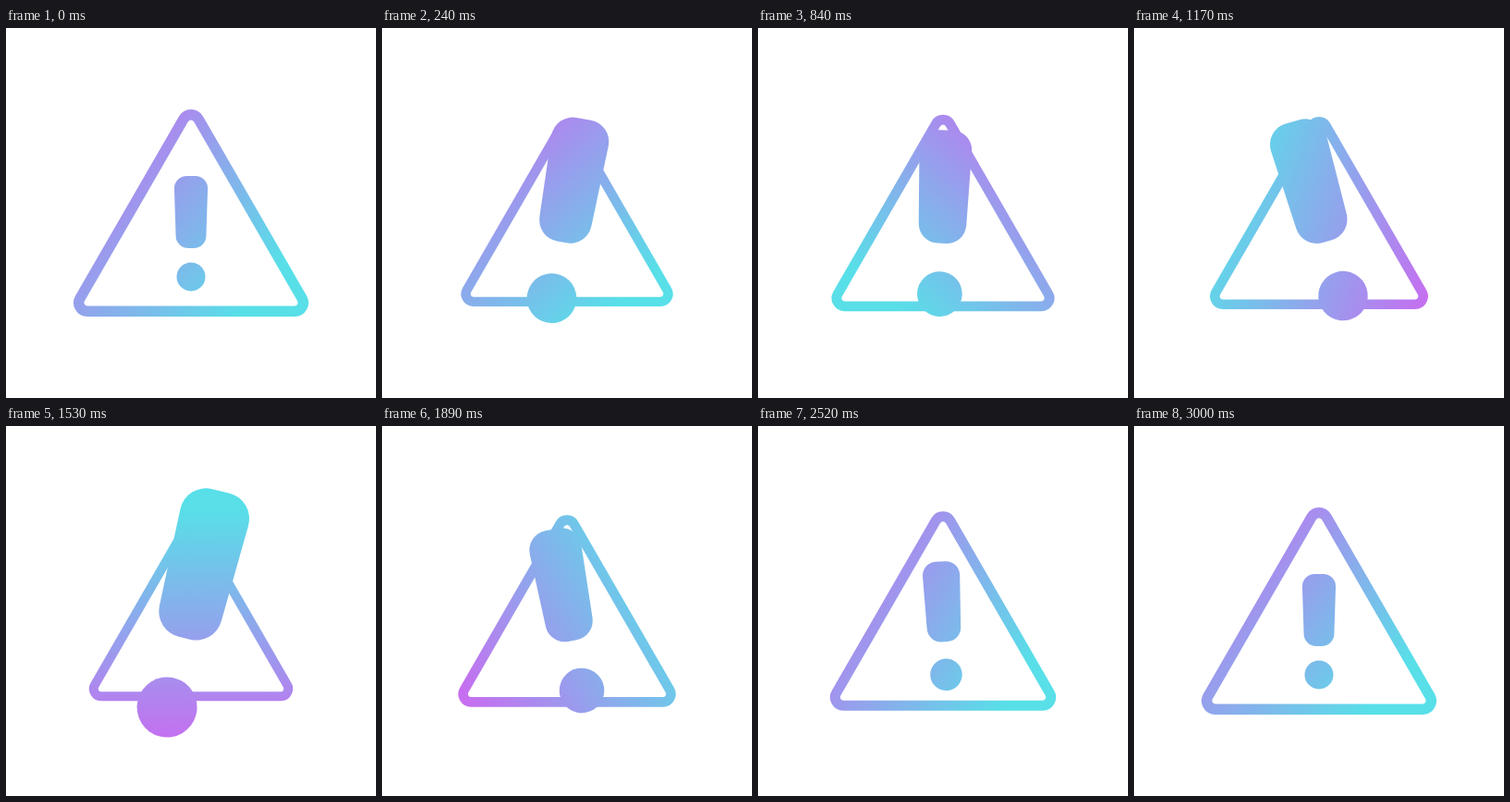
Write an HTML page with a canvas that moves like this. It is 400x400 px and loops after 5030 ms.

```html
<!DOCTYPE html>
<html lang="en">
<head>
<meta charset="utf-8">
<title>Warning</title>
<style>
  html, body { margin: 0; width: 100%; height: 100%; overflow: hidden; background: #fff; }
  canvas { display: block; width: 100vw; height: 100vh; }
</style>
</head>
<body>
<canvas id="stage" width="400" height="400"></canvas>
<script>
const ctx = document.getElementById('stage').getContext('2d');
const { PI, sin, cos, sqrt } = Math;
const LOOP = 5030, MOVE = 3000, STEP = 30;

// Turning points of the two pulses as [ms, scale]; a cosine joins neighbours.
const trianglePulse = [[0, 1], [400, .85], [900, .952], [1720, .855], [2210, 1.118], [2540, .96], [MOVE, 1]];
const markPulse = [[0, 1], [400, 2.12], [900, 1.55], [1620, 2.12], [2200, .88], [2540, 1.115], [MOVE, 1]];

const ease = u => (1 - cos(PI * u)) / 2;

function pulse(points, t) {
  const i = Math.max(1, points.findIndex(p => p[0] >= t));
  const [t0, a] = points[i - 1], [t1, b] = points[i];
  return a + (b - a) * ease((t - t0) / (t1 - t0));
}

// A swing that quickens while it dies out, in radians.
const swing = x => 19 * PI / 180 * (1 - x ** 3) ** 2 * sin(PI * x * (1.78 + 5.87 * x));
const bob = x => 2.9 * (2 * x - 1) ** 2 * cos(6 * PI * x);
const gradientAngle = x => PI / 180 * (40 + 360 * ease(1 - (1 - x) ** 1.25));

function gradient(angle) {
  const point = d => [d * cos(angle), d * sin(angle)];
  const g = ctx.createLinearGradient(...point(-140), ...point(110));
  g.addColorStop(0, '#c56ff0');
  g.addColorStop(1, '#58dfe8');
  return g;
}

function roundedPath(points, radius) {
  const n = points.length, [a, b] = [points[n - 1], points[0]];
  ctx.beginPath();
  ctx.moveTo((a[0] + b[0]) / 2, (a[1] + b[1]) / 2);
  points.forEach((p, i) => ctx.arcTo(...p, ...points[(i + 1) % n], radius));
  ctx.closePath();
}

// Paths are built under a transform but painted in stage space, so all share one gradient.
function shape(transform, build) {
  ctx.save();
  transform();
  build();
  ctx.restore();
}

function draw(t) {
  const x = t / MOVE;
  const size = pulse(trianglePulse, t), mark = pulse(markPulse, t);

  ctx.setTransform(1, 0, 0, 1, 0, 0);
  ctx.clearRect(0, 0, 400, 400);
  ctx.translate(200, 200);
  ctx.fillStyle = ctx.strokeStyle = gradient(gradientAngle(x));

  const r = 9.3, w = 112 + r * sqrt(3);
  shape(() => ctx.scale(size, size),
    () => roundedPath([[0, -97 - 2 * r], [w, 97 + r], [-w, 97 + r]], r));
  ctx.lineWidth = 11.4 * size;
  ctx.stroke();

  const place = y => () => {
    ctx.rotate(swing(x));
    ctx.translate(0, y + bob(x));
    ctx.scale(mark, mark);
  };
  shape(place(39.6 - 43.5 * mark),
    () => roundedPath([[-18.5, -39], [18.5, -39], [16, 39], [-16, 39]], 13.5));
  ctx.fill();
  shape(place(28.5 + 37.5 * mark), () => {
    ctx.beginPath();
    ctx.arc(0, 0, 15.5, 0, 2 * PI);
  });
  ctx.fill();
}

const start = performance.now();
function tick() {
  const t = (performance.now() - start) % LOOP;
  draw(Math.min(MOVE, Math.floor(t / STEP) * STEP));
  requestAnimationFrame(tick);
}
tick();
</script>
</body>
</html>
```
